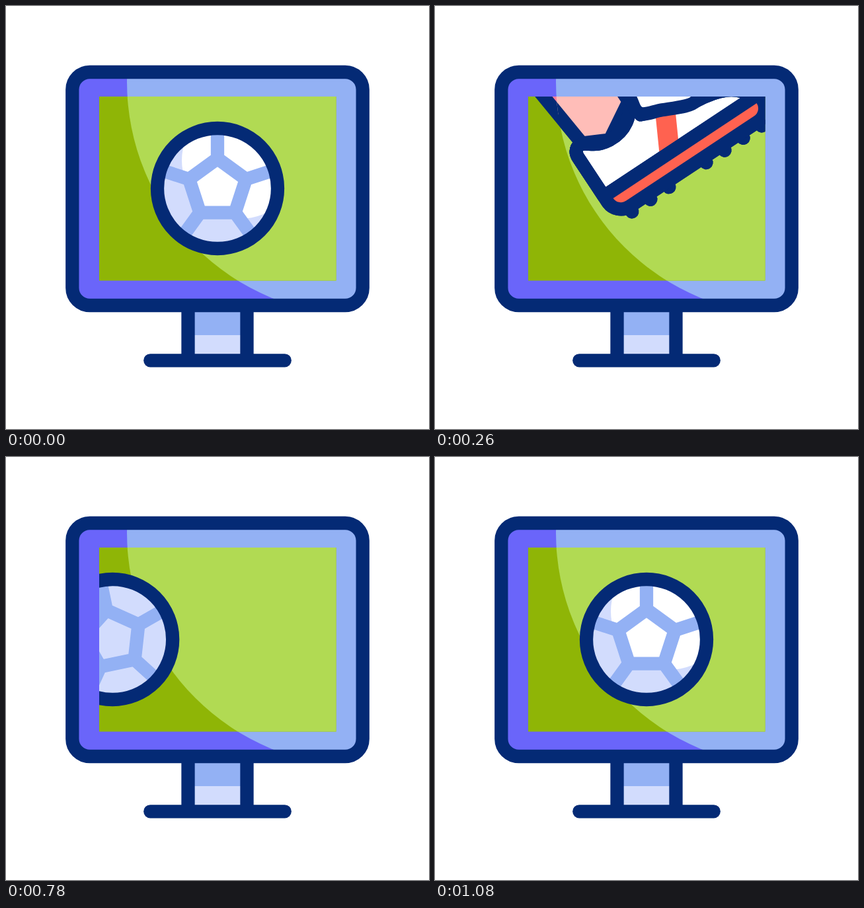
Animation of 640x640 px, one loop 1.6 s. Source, as an HTML page:

```html
<!DOCTYPE html>
<html lang="en">
<head>
<meta charset="utf-8">
<title>Football on screen</title>
<style>
  html, body { margin: 0; width: 100%; height: 100%; overflow: hidden; background: #fff; }
  svg { display: block; width: 100vw; height: 100vh; }
  .line { fill: none; stroke: #042a75; stroke-width: 20.3; stroke-linejoin: round; }
  .seam { fill: none; stroke: #93b1f4; stroke-width: 20.3; }
</style>
</head>
<body>
<svg viewBox="0 0 640 640">
  <defs>
    <clipPath id="shine"><circle cx="536" cy="115" r="353"/></clipPath>
    <clipPath id="bezel"><rect x="100" y="100" width="440" height="353" rx="26"/></clipPath>
    <clipPath id="screen"><rect x="141" y="137" width="358.5" height="278.5"/></clipPath>
    <clipPath id="inBall"><circle r="86"/></clipPath>
  </defs>

  <rect x="280" y="455" width="80" height="43" fill="#93b1f4"/>
  <rect x="280" y="498" width="80" height="34" fill="#d2dcfd"/>
  <path class="line" d="M275.5 455V532M364.5 455V532"/>
  <path class="line" d="M218.3 536.3H421.7" stroke-linecap="round"/>

  <g clip-path="url(#bezel)">
    <rect x="90" y="90" width="460" height="373" fill="#6a65fa"/>
    <circle cx="536" cy="115" r="353" fill="#93b1f4"/>
  </g>
  <g clip-path="url(#screen)">
    <rect x="141" y="137" width="359" height="279" fill="#8fb506"/>
    <circle cx="536" cy="115" r="353" fill="#b1da53"/>
    <g id="kick">
      <g><g class="boot" id="bootDark"></g></g>
      <g clip-path="url(#shine)"><g class="boot" id="bootLight"></g></g>
    </g>
    <g id="ball">
      <circle r="91" fill="#d2dcfd"/>
      <g clip-path="url(#inBall)"><circle id="gloss" cy="-42.5" r="88.5" fill="#fff"/></g>
      <path id="seams" class="seam"/>
      <circle class="line" r="91"/>
    </g>
  </g>
  <rect class="line" x="100.3" y="100" width="439.4" height="353" rx="26.5"/>
</svg>

<script>
const LOOP = 1600, STEP = 20;
const $ = id => document.getElementById(id);

// Local axes: x runs along the sole, origin at the first stud.
const studs = [0, 1, 2, 4, 5, 6, 7];
const leg = 'M-36 -420L-6 -128L32 -109L88 -142V-420';
const upper = 'M-22.6 -42.7V-112C-22.6 -126 -12 -131 -3 -125S12 -111 32 -109' +
  'C60 -107 80 -122 88 -142L92 -115L174 -86C208 -82 236 -74 250 -42.7Z';
const tongue = 'M98 -156C106 -157 116 -155 125 -150C136 -143 143 -134 154 -126' +
  'C166 -117 176 -112 180 -105C184 -97 181 -88 172 -86C162 -84 145 -93 123 -103' +
  'C112 -108 102 -109 94 -115C88 -121 89 -128 91 -136C93 -144 92 -152 98 -156Z';
const sole = 'M-22.6 -42.7H258V-32.4A24 24 0 0 1 234 -8.4H1.4A24 24 0 0 1 -22.6 -32.4Z';

function boot(skin, cloth, trim) {
  const part = (d, fill) => `<path class="line" d="${d}" style="fill:${fill}"/>`;
  return part(leg, skin) + part(upper, cloth) +
    `<path d="M83 -50H117.5L149 -110H114.5Z" fill="${trim}"/>` +
    `<path class="line" d="${upper}"/>` + part(tongue, cloth) +
    studs.map(n => `<circle cx="${n * 33.65}" r="10.4" fill="#042a75"/>`).join('') +
    part(sole, trim);
}
$('bootDark').innerHTML = boot('#ff7e9f', '#d2dcfd', '#bd3c88');
$('bootLight').innerHTML = boot('#ffbdb8', '#fff', '#ff6250');

const corners = [0, 1, 2, 3, 4].map(i => {
  const a = (i * 72 - 90) * Math.PI / 180;
  return r => `${r * Math.cos(a)} ${r * Math.sin(a)}`;
});
$('seams').setAttribute('d', 'M' + corners.map(c => c(45.2)).join('L') + 'Z' +
  corners.map(c => `M${c(45.2)}L${c(88)}`).join(''));

const clamp = v => Math.max(0, Math.min(1, v));
const span = (t, a, b) => clamp((t - a) / (b - a));

function bezier(x1, y1, x2, y2) {
  const at = (s, a, b) => 3 * (1 - s) ** 2 * s * a + 3 * (1 - s) * s * s * b + s ** 3;
  return x => {
    let lo = 0, hi = 1;
    for (let i = 0; i < 24; i++) {
      const mid = (lo + hi) / 2;
      if (at(mid, x1, x2) < x) lo = mid; else hi = mid;
    }
    return at((lo + hi) / 2, y1, y2);
  };
}
const rollEase = bezier(.167, .14, .825, 1);
const swingEase = p => .7 * p * p * (3 - 2 * p) + .3 * p;

function ballX(t) {
  if (t < 108) return 320;
  if (t < 420) return 320 + 1.97 * (t - 108);
  return 49 + 271 * rollEase(span(t, 600, 1080));
}

function draw(t) {
  // The leg swings about a knee above the screen.
  const angle = 40 - 116 * swingEase(span(t, 20, 420));
  const pose = `translate(157.9 33.7) rotate(${angle}) translate(-36.3 308.6)`;
  for (const b of document.querySelectorAll('.boot')) b.setAttribute('transform', pose);
  const seen = t < 40 || t >= 620 ? 0
    : Math.min(span(t, 20, 80), 1 - .945 * span(t, 340, 420));
  $('kick').setAttribute('opacity', seen);

  const x = ballX(t);
  const spin = t < 420 ? 0 : -134 * (1 - span(t, 600, 1080));
  $('ball').setAttribute('transform', `translate(${x} 276)`);
  $('gloss').setAttribute('cx', 354.5 - x);
  $('seams').setAttribute('transform', `rotate(${spin})`);
}

const start = performance.now();
function tick() {
  const t = (performance.now() - start) % LOOP;
  draw(Math.floor(t / STEP) * STEP);
  requestAnimationFrame(tick);
}
tick();
</script>
</body>
</html>
```
